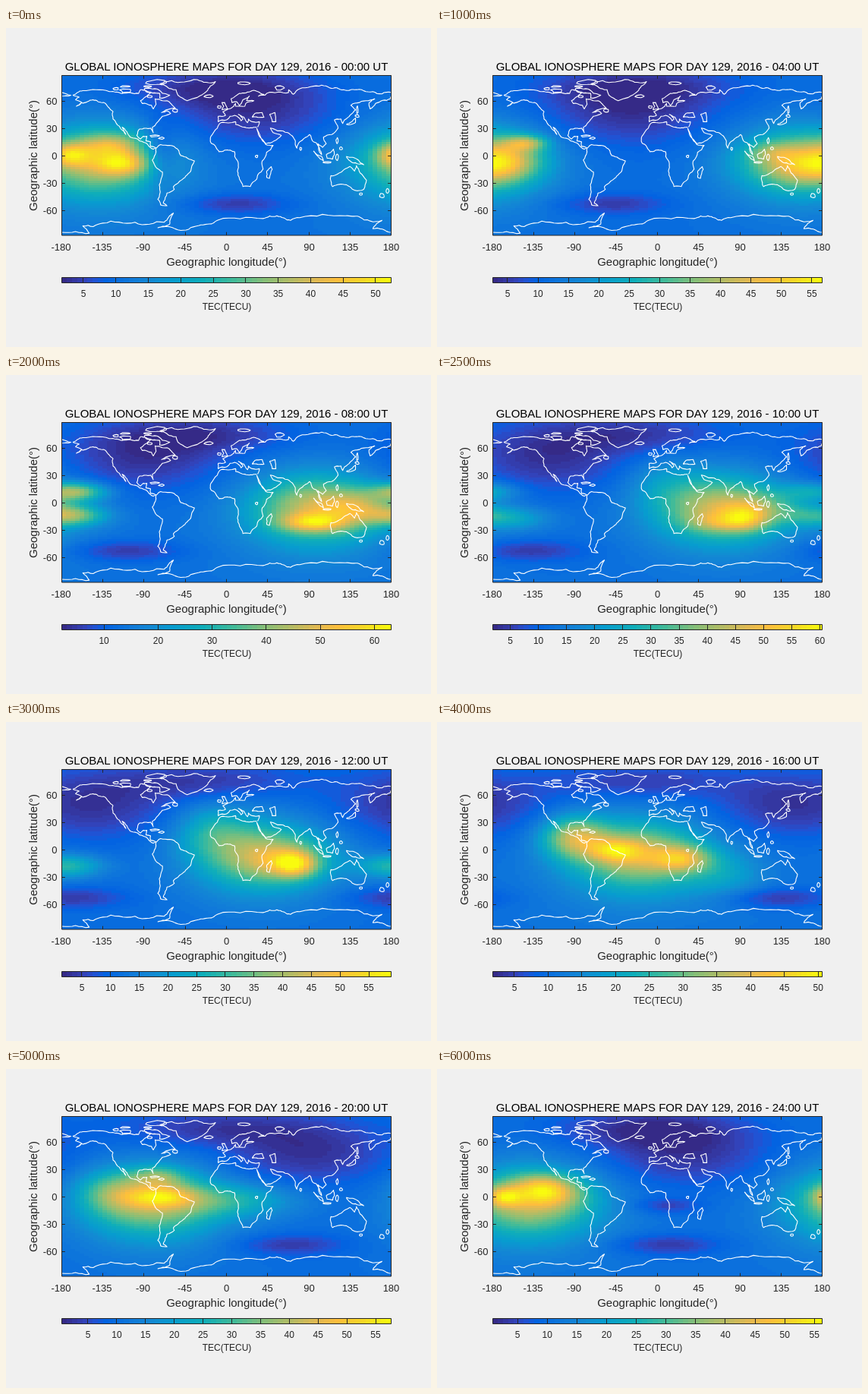
Recreate the animation shown at these times as an HTML page with a canvas. Size 560 by 420 pixels, loop 6.5 s.

```html
<!DOCTYPE html>
<html lang="en">
<head>
<meta charset="utf-8">
<title>Global ionosphere maps</title>
<style>
html, body { margin: 0; width: 100%; height: 100%; overflow: hidden; background: #f0f0f0; }
#stage { position: relative; width: 560px; height: 420px; overflow: hidden; }
canvas { position: absolute; left: 73px; top: 63px; width: 434px; height: 210px; image-rendering: pixelated; }
svg { position: absolute; left: 0; top: 0; }
text { font-family: "Liberation Sans", Arial, sans-serif; fill: #262626; }
</style>
</head>
<body>
<div id="stage">
<canvas id="heat" width="72" height="70"></canvas>
<svg width="560" height="420" viewBox="0 0 560 420">
  <path id="coast" fill="none" stroke="#fff" stroke-width="1.1" stroke-linejoin="round" vector-effect="non-scaling-stroke" transform="translate(290.5 167.9) scale(1.2056 -1.2029)"/>
  <g id="bar" shape-rendering="crispEdges"></g>
  <path id="axes" fill="none" stroke="#262626"/>
  <path id="barTicks" fill="none" stroke="#262626"/>
  <g id="labels"></g>
  <g id="barLabels"></g>
</svg>
</div>
<script>
const COLS = 72, ROWS = 70, STEP = 500, COUNT = 13;
const LEFT = 73.5, RIGHT = 507.5, TOP = 62.5, BOTTOM = 273;
const el = id => document.getElementById(id);

// Colour scale: [level of 64, r, g, b]
const STOPS = [
  [1, 53, 42, 135], [5, 50, 67, 186], [7, 32, 83, 212], [9, 3, 99, 225], [14, 16, 121, 218],
  [18, 19, 137, 211], [22, 7, 156, 207], [28, 15, 174, 185], [34, 66, 187, 152], [40, 135, 191, 119],
  [50, 225, 185, 82], [54, 253, 190, 61], [59, 247, 216, 38], [64, 249, 251, 14]
];
const palette = Array.from({ length: 64 }, (_, i) => {
  const n = i + 1;
  const j = Math.max(1, STOPS.findIndex(s => s[0] >= n));
  const a = STOPS[j - 1], b = STOPS[j], f = (n - a[0]) / (b[0] - a[0]);
  return [1, 2, 3].map(c => Math.round(a[c] + (b[c] - a[c]) * f));
});

// Bumps are [height, lon, lat, lon spread, lat spread].
// The daylight halo and the night side follow the sun.
const daily = sun => [
  [.4, sun, -5, 48, 24], [.12, sun, -20, 65, 36],
  [-.14, sun + 170, 50, 65, 26], [-.12, sun + 150, -53, 42, 8], [-.11, -20, 75, 70, 14]
];
// Local crests, every four hours
const CRESTS = [
  [[.28, -112, -9, 20, 9], [.3, -172, 1, 16, 9], [.2, -125, 12, 22, 9], [-.15, -73, 0, 13, 24]],
  [[.18, 160, -13, 35, 13], [.15, 125, 4, 20, 8], [.28, -162, -4, 26, 16], [.32, -142, 14, 16, 6]],
  [[.3, 95, -22, 25, 7], [.2, 145, -5, 28, 12], [.4, -165, 12, 24, 7], [.35, -168, -14, 26, 8]],
  [[.38, 76, -16, 16, 10], [.2, -15, 22, 28, 20], [.3, -175, -18, 28, 9], [.15, 60, -13, 30, 14]],
  [[.4, -90, 14, 25, 16], [.3, 28, -10, 22, 10], [.25, -45, -1, 20, 9], [.12, 75, -28, 30, 18]],
  [[.25, -70, 0, 25, 8], [.22, -75, 22, 20, 8], [.2, -125, 5, 25, 16], [.22, 10, -4, 50, 13]],
  [[.3, -168, 0, 14, 8], [.25, -115, 4, 24, 11], [.15, -128, 14, 22, 9], [-.1, 10, -10, 25, 6]]
];
// Scale limits for each two-hour map
const LOW = [1.67, 2.1, 2.57, 2.4, 2.2, 1.9, 1.5, 1.6, 1.8, 1.1, .45, .65, .84];
const HIGH = [52.4, 54.5, 56.7, 59.9, 63.1, 60.4, 58.9, 54.8, 50.6, 55.6, 57.7, 57, 56.3];

function level(bumps, lon, lat) {
  let v = .165;
  for (const [h, x, y, sx, sy] of bumps) {
    const dx = ((lon - x + 900) % 360 - 180) / sx, dy = (lat - y) / sy;
    v += h * Math.exp(-(dx * dx + dy * dy) / 2);
  }
  return Math.min(1, Math.max(0, v));
}

// Odd maps blend their neighbours' crests, drifting west with the sun
function bumpsAt(k) {
  const sun = (580 - 30 * k) % 360;
  const move = (list, d) => list.map(([h, x, ...rest]) => [h / 2, x + d, ...rest]);
  const crests = k % 2
    ? [...move(CRESTS[(k - 1) / 2], -22), ...move(CRESTS[(k + 1) / 2], 22)]
    : CRESTS[k / 2];
  return [...daily(sun > 180 ? sun - 360 : sun), ...crests];
}

function field(k) {
  const bumps = bumpsAt(k), out = [];
  for (let r = 0; r < ROWS; r++)
    for (let c = 0; c < COLS; c++) out.push(level(bumps, -177.5 + 5 * c, 86.25 - 2.5 * r));
  const top = Math.max(...out);
  return out.map(v => v / top);
}

const ctx = el("heat").getContext("2d");
const maps = Array.from({ length: COUNT }, (_, k) => {
  const img = ctx.createImageData(COLS, ROWS);
  field(k).forEach((v, i) => img.data.set([...palette[Math.min(63, Math.floor(v * 64))], 255], i * 4));
  return img;
});

// Seeded roughness for the shores
let seed = 7;
const rand = () => (seed = seed * 16807 % 2147483647) / 2147483647 - .5;
function rough(a, b, depth) {
  const dx = b[0] - a[0], dy = b[1] - a[1];
  if (!depth || Math.hypot(dx, dy) < 3) return [b];
  const k = rand() * .22;
  const m = [(a[0] + b[0]) / 2 - dy * k, (a[1] + b[1]) / 2 + dx * k];
  return [...rough(a, m, depth - 1), ...rough(m, b, depth - 1)];
}
let shore = "";
function draw(pts) {
  shore += "M" + pts.map(p => p.map(n => n.toFixed(1)).join(" ")).join("L");
}
function land(s, closed) {
  const pts = s.split(/,\s*/).map(p => p.split(" ").map(Number));
  if (closed) pts.push(pts[0]);
  draw(pts.slice(1).reduce((out, p, i) => out.concat(rough(pts[i], p, 3)), [pts[0]]));
}
function isle(lon, lat, rx, ry) {
  const pts = Array.from({ length: 9 }, (_, i) => {
    const a = i * Math.PI * 2 / 9, r = 1 + rand() * .5;
    return [lon + rx * r * Math.cos(a), lat + ry * r * Math.sin(a)];
  });
  draw([...pts, pts[0]]);
}

// Americas
land("-168 66, -163 69, -157 71, -128 70, -114 68, -96 68, -94 72, -82 69, -87 65, -94 60, -92 57, -82 55, -80 51, -77 56, -78 62, -70 60, -65 60, -56 52, -66 50, -71 47, -65 49, -61 46, -66 44, -70 43, -76 36, -81 31, -80 25, -83 30, -95 29, -98 22, -94 18, -91 21, -87 21, -88 16, -83 15, -83 10, -77 8");
land("-78 8, -80 7, -86 12, -95 16, -105 20, -114 31, -110 23, -117 32, -124 40, -124 48, -134 58, -146 61, -152 59, -164 54, -158 58, -165 61, -161 64, -168 66");
land("-77 8, -72 12, -62 11, -52 5, -50 0, -35 -6, -39 -17, -48 -26, -58 -34, -57 -37, -65 -41, -67 -46, -69 -52, -65 -55, -72 -54, -75 -48, -73 -37, -70 -18, -76 -14, -81 -5, -77 4", true);
land("-73 78, -60 82, -32 83, -12 81, -22 70, -43 60, -53 66, -55 72, -66 76", true);
land("-90 73, -77 73, -62 66, -73 63, -73 68, -88 70", true);
// Europe and Africa
land("68 69, 44 68, 42 66, 35 65, 41 67, 28 71, 14 68, 5 62, 6 58, 11 59, 14 55, 18 61, 25 65, 22 60, 30 60, 21 57, 20 54, 10 54, 10 57, 8 54, 2 51, -4 48, -1 44, -9 43, -9 37, 0 39, 4 43, 9 44, 16 38, 18 40, 13 45, 19 42, 23 36, 24 40, 28 37, 36 37, 34 31");
land("33 31, 20 31, 10 34, 10 37, -6 36, -10 30, -17 21, -17 14, -8 4, 4 6, 9 4, 9 -1, 13 -9, 12 -17, 18 -34, 26 -34, 33 -26, 35 -20, 40 -15, 39 -6, 51 11, 43 12, 37 21, 33 30");
land("-5 50, 1 51, -2 58, -5 58, -3 54", true);
land("28 42, 31 46, 39 47, 41 42", true);
land("47 45, 53 47, 54 37, 50 37, 49 41", true);
// Asia and Oceania
land("33 30, 43 13, 52 16, 60 22, 51 25, 48 30, 56 27, 67 25, 73 20, 77 8, 80 15, 91 23, 94 16, 98 14, 104 1, 100 13, 105 9, 109 13, 106 20, 115 23, 122 30, 118 39, 125 40, 127 35, 129 39, 141 50, 136 55, 155 60, 162 62, 156 58, 157 51, 163 57, 179 62, 180 65");
land("180 69, 160 70, 140 72, 128 72, 113 74, 104 77, 80 73, 73 67, 68 72, 68 69");
land("-180 65, -170 66, -180 69");
land("114 -22, 116 -34, 131 -32, 140 -38, 150 -37, 153 -27, 146 -19, 142 -11, 140 -17, 135 -12, 129 -15", true);
land("131 34, 137 37, 141 41, 141 36, 136 34", true);
land("131 -1, 138 -2, 150 -10, 138 -8, 133 -4", true);
land("109 1, 117 7, 118 1, 116 -4, 110 -3", true);
land("95 5, 104 -1, 106 -6, 100 -1", true);
land("49 -12, 50 -15, 47 -25, 44 -24, 44 -17", true);
// Antarctica
land("-180 -84, -150 -85, -157 -77, -135 -74, -100 -73, -68 -73, -58 -63, -62 -75, -75 -79, -50 -82, -28 -76, -10 -71, 40 -69, 55 -66, 70 -71, 80 -68, 130 -66, 145 -67, 170 -71, 160 -80, 180 -84");
// Islands and a lake
isle(-110, 71, 6, 2);
isle(-121, 73, 3, 1.3);
isle(-78, 80, 11, 2.7);
isle(-86, 75.5, 5, .8);
isle(-111, 75.5, 5, .8);
isle(-84, 64.5, 3, 1);
isle(-56, 49, 3, 2);
isle(19, 79, 6, 1.4);
isle(58, 74, 5, 2.2);
isle(-19, 65, 5, 1.5);
isle(-8, 53, 2, 1.6);
isle(-79, 21.5, 5, 1);
isle(-71, 19, 3, 1);
isle(33, -1, 1.3, 1.3);
isle(81, 7.5, 1, 1.7);
isle(110, -7.5, 4.5, .7);
isle(121, -2, 1.5, 3);
isle(121, 16, 1.2, 3);
isle(125, 8, 1.8, 1.6);
isle(143, 43.5, 2, 1.5);
isle(143, 50, .8, 4);
isle(147, -42, 1.6, 1.3);
isle(176, -39, 1.6, 2.5);
isle(170, -44, 2.4, 2.5);
el("coast").setAttribute("d", shore);

const text = (x, y, s, size, anchor = "middle", extra = "") =>
  `<text x="${x}" y="${y}" font-size="${size}" text-anchor="${anchor}" ${extra}>${s}</text>`;

let frame = `M${LEFT} ${TOP}H${RIGHT}V${BOTTOM}H${LEFT}Z`;
let labels = text(290.5, 56, "", 15, "middle", 'id="title" style="fill:#000"')
  + text(290.5, 313, "Geographic longitude(°)", 15)
  + text(0, 0, "Geographic latitude(°)", 15, "middle", 'transform="translate(41 168) rotate(-90)"')
  + text(291, 371, "TEC(TECU)", 12);
for (let lon = -180; lon <= 180; lon += 45) {
  const x = Math.floor(290.5 + lon * 1.2056) + .5;
  frame += `M${x} ${BOTTOM}v-4.3M${x} ${TOP}v4.3`;
  labels += text(x - (lon < 0 ? 1 : 0), 293, lon, 13);
}
for (let lat = -60; lat <= 60; lat += 30) {
  const y = Math.round(167.9 - lat * 1.2029) + .5;
  frame += `M${LEFT} ${y}h4.3M${RIGHT} ${y}h-4.3`;
  labels += text(67.5, y + 4.5, lat, 13, "end");
}
el("axes").setAttribute("d", frame);
el("labels").innerHTML = labels;

const cell = (RIGHT - LEFT) / 64;
el("bar").innerHTML = palette.map((c, i) =>
  `<rect x="${LEFT + i * cell}" y="328.5" width="${cell + .3}" height="7" fill="rgb(${c})"/>`).join("");

function show(k) {
  ctx.putImageData(maps[k], 0, 0);
  const hour = String(k * 2).padStart(2, "0");
  el("title").textContent = `GLOBAL IONOSPHERE MAPS FOR DAY 129, 2016 - ${hour}:00 UT`;
  const lo = LOW[k], hi = HIGH[k], step = hi - lo > 60 ? 10 : 5;
  let d = `M${LEFT} 328.5H${RIGHT}V335.5H${LEFT}Z`, names = "";
  for (let v = step; v <= hi; v += step) {
    const x = LEFT + (v - lo) / (hi - lo) * (RIGHT - LEFT);
    const px = Math.floor(x) + .5;
    d += `M${px} 335.5v-4M${px} 328.5v4`;
    names += text(x.toFixed(1), 354, v, 12);
  }
  el("barTicks").setAttribute("d", d);
  el("barLabels").innerHTML = names;
}

let shown = -1;
function tick(now) {
  const k = Math.floor(now / STEP) % COUNT;
  if (k !== shown) show(shown = k);
  requestAnimationFrame(tick);
}
show(0);
requestAnimationFrame(tick);
</script>
</body>
</html>
```
